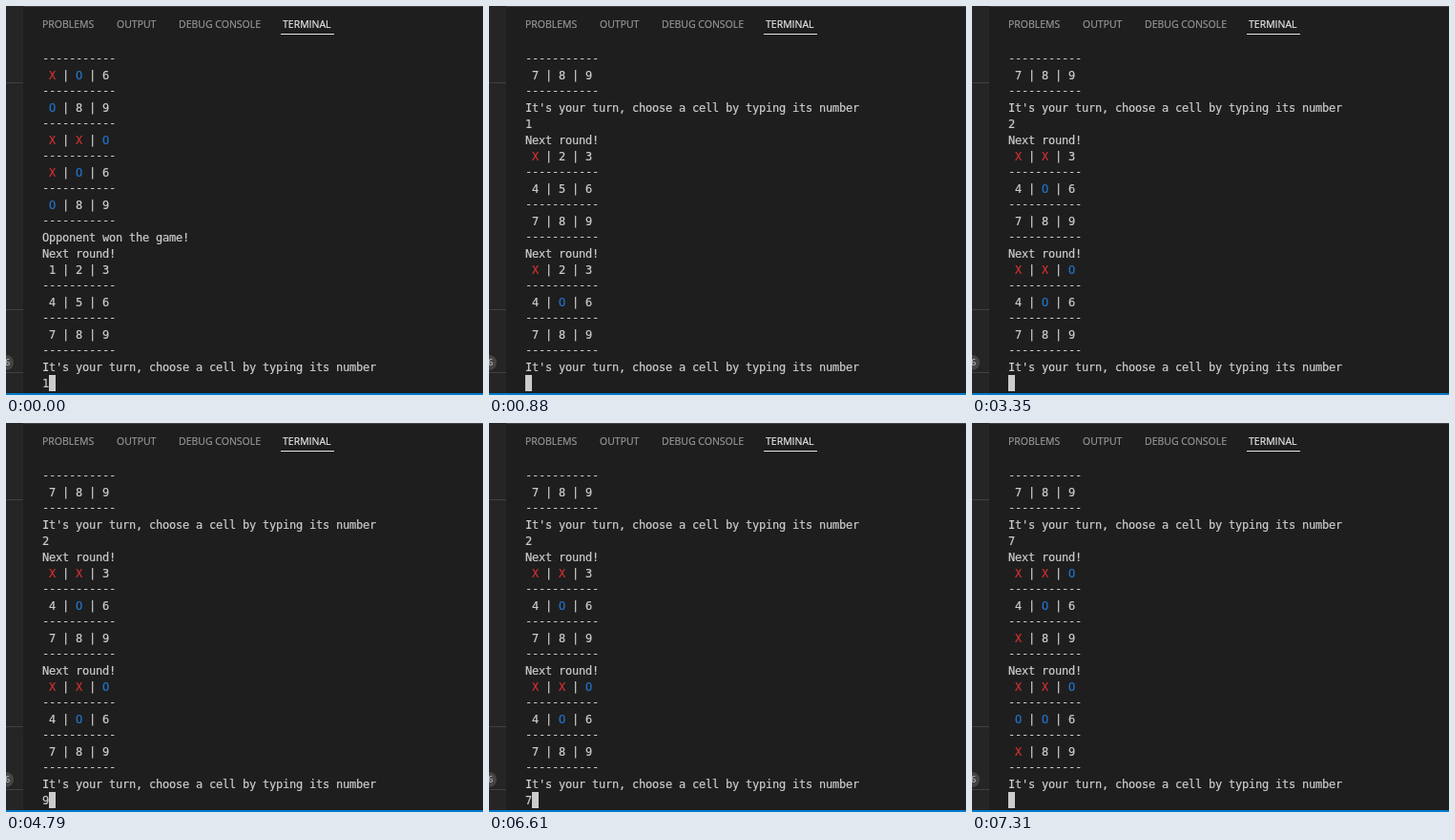
Recreate the animation shown at these times as an HTML page with a canvas. Size 500 by 408 pixels, loop 8 s.

```html
<!DOCTYPE html>
<html lang="en">
<head>
<meta charset="utf-8">
<title>Terminal game</title>
<style>
  html, body { margin: 0; width: 100%; height: 100%; overflow: hidden; background: #1e1e1e; }
  canvas { display: block; width: 500px; height: 408px; }
</style>
</head>
<body>
<canvas id="stage"></canvas>
<script>
const W = 500, H = 408, LOOP = 8000;
const LEFT = 38, TOP = 47, CELL = 7, LINE = 17, ROWS = 21;
const MARKS = { X: '#cd3131', O: '#2472c8' };
const TEXT = '#cccccc';

const canvas = document.getElementById('stage');
const ctx = canvas.getContext('2d');
const ratio = window.devicePixelRatio || 1;
canvas.width = W * ratio;
canvas.height = H * ratio;
ctx.scale(ratio, ratio);
ctx.lineJoin = 'round';

const RULE = '-'.repeat(11);
const ASK = "It's your turn, choose a cell by typing its number";
const board = cells => cells.match(/.{3}/g).flatMap(row => [' ' + [...row].join(' | '), RULE]);
const round = cells => ['Next round!', ...board(cells)];

// The terminal log grows; each step shows its last rows.
const opening = [
  ...board('XXOXO6O89'), ...board('XXOXO6O89'),
  'Opponent won the game!', ...round('123456789'), ASK
];
const first = [...opening, '1', ...round('X23456789'), ...round('X234O6789'), ASK];
const second = [...first, '2', ...round('XX34O6789'), ...round('XXO4O6789'), ASK];
const third = [...second, '7', ...round('XXO4O6X89'), ...round('XXOOO6X89'), ASK];

const steps = [
  { at: 0, log: [...opening, '1'] },
  { at: 420, log: [...first, ''] },
  { at: 1180, log: [...second, ''] },
  { at: 4790, log: [...second, '9'] },
  { at: 6610, log: [...second, '7'] },
  { at: 7160, log: [...second, '7', ...round('XXO4O6X89').slice(0, 3)] },
  { at: 7310, log: [...third, ''] }
];

function rect(color, x, y, w, h) {
  ctx.fillStyle = color;
  ctx.fillRect(x, y, w, h);
}

// A hairline outline gives the text a slightly heavier weight.
function label(text, x, y, color, weight) {
  ctx.fillStyle = ctx.strokeStyle = color;
  ctx.lineWidth = weight;
  ctx.fillText(text, x, y);
  ctx.strokeText(text, x, y);
}

function drawFrame() {
  rect('#1e1e1e', 0, 0, W, H);
  rect('#414141', 18, 0, W - 18, 1);
  rect('#252526', 0, 0, 18, H);
  for (const y of [80, 318, 384]) rect('#414141', 0, y, 18, 1);

  ctx.fillStyle = '#454545';
  ctx.beginPath();
  ctx.arc(0, 374, 8, 0, Math.PI * 2);
  ctx.fill();

  ctx.textAlign = 'left';
  ctx.font = '9px "Open Sans", sans-serif';
  label('6', -1, 377, TEXT, 0.1);

  ctx.font = '10.5px "Open Sans", sans-serif';
  label('PROBLEMS', 38, 23, '#979797', 0.2);
  label('OUTPUT', 116, 23, '#979797', 0.2);
  label('DEBUG CONSOLE', 181, 23, '#979797', 0.2);
  label('TERMINAL', 290, 23, '#e7e7e7', 0.2);
  rect('#e7e7e7', 288, 29, 56, 1);
  rect('#007acc', 0, 406, W, 2);
}

function drawLog(log) {
  const lines = log.slice(-ROWS);
  ctx.font = '12px "DejaVu Sans Mono", monospace';
  ctx.textAlign = 'center';
  lines.forEach((line, row) => {
    const isBoard = line.includes('|');
    const baseline = TOP + row * LINE + (line === RULE ? 12 : 13);
    [...line].forEach((ch, col) => {
      const color = isBoard && MARKS[ch] || TEXT;
      label(ch, LEFT + (col + 0.5) * CELL, baseline, color, 0.2);
    });
  });
  const last = lines.length - 1;
  rect(TEXT, LEFT + lines[last].length * CELL, TOP + last * LINE, CELL, LINE);
}

let shown = null;
function tick() {
  const t = performance.now() % LOOP;
  const step = steps.filter(s => s.at <= t).pop();
  if (step !== shown) {
    drawFrame();
    drawLog(step.log);
    shown = step;
  }
  requestAnimationFrame(tick);
}
tick();
</script>
</body>
</html>
```
